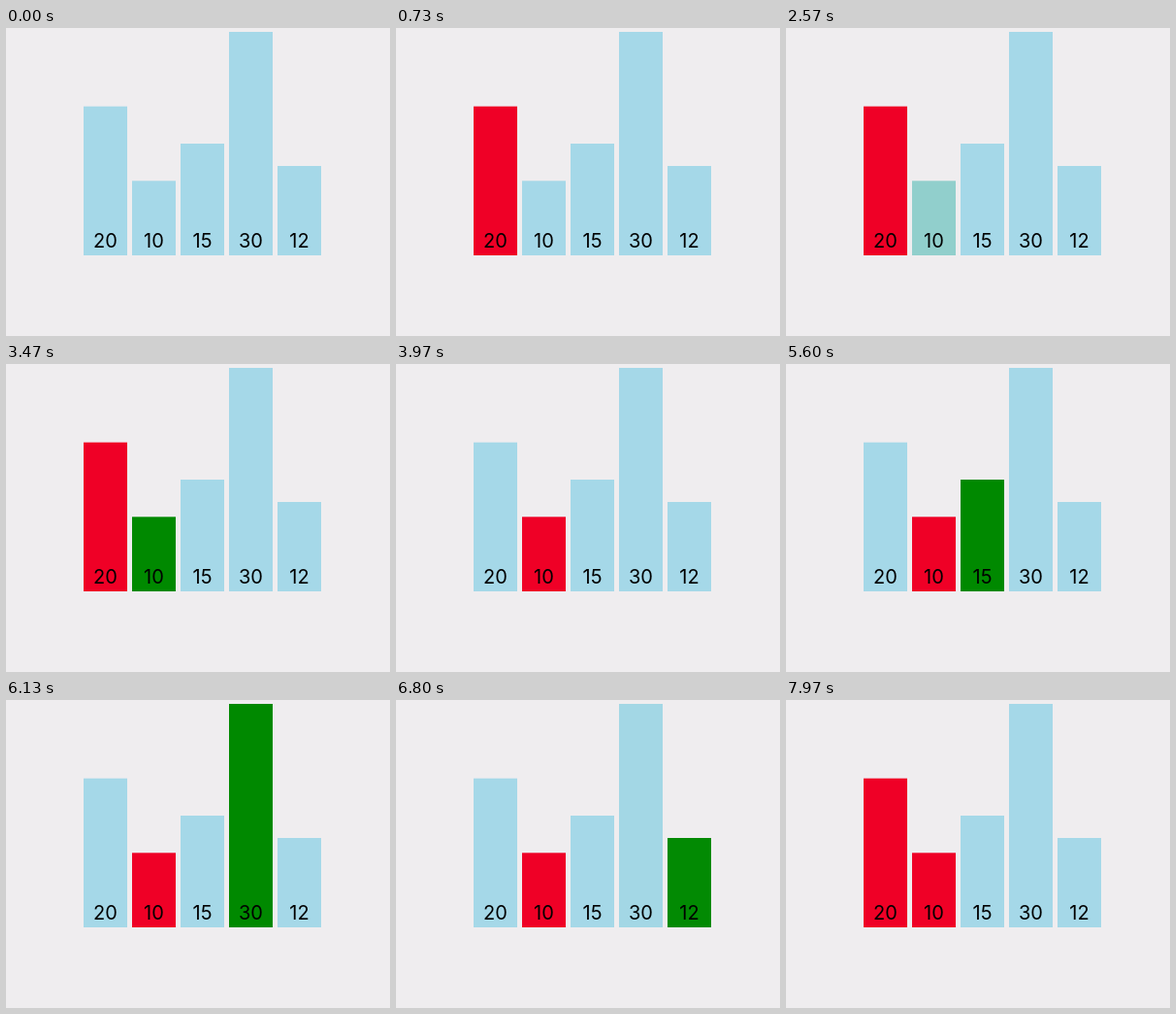
These frames come from a looping animation (396 by 317 pixels, 8 s). An HTML page:

```html
<!DOCTYPE html>
<html lang="en">
<head>
<meta charset="utf-8">
<title>Selection sort</title>
<style>
  :root {
    --idle: #a5d8e8;
    --min: #ef0026;
    --scan: #008900;
  }
  html, body {
    margin: 0;
    width: 100%;
    height: 100%;
    overflow: hidden;
    background: #efedef;
  }
  svg { display: block; width: 100vw; height: 100vh; }
  text {
    font: 400 20px Inter, "Liberation Sans", sans-serif;
    text-anchor: middle;
    fill: #000;
  }
  rect {
    fill: var(--idle);
    animation: 8s ease infinite;
  }
  #a { animation-name: a; }
  #b { animation-name: b; }
  #c { animation-name: c; }
  #d { animation-name: d; }
  #e { animation-name: e; }

  /* Each colour change eases over 200 ms (2.5% of the loop). */
  @keyframes a {
    0%, 3.94% { fill: var(--idle); }
    6.44%, 44.61% { fill: var(--min); }
    47.11%, 95.69% { fill: var(--idle); }
    98.19%, 100% { fill: var(--min); }
  }
  @keyframes b {
    0%, 31.85% { fill: var(--idle); }
    34.35%, 44.61% { fill: var(--scan); }
    47.11%, 100% { fill: var(--min); }
  }
  @keyframes c {
    0%, 57.39% { fill: var(--idle); }
    59.89%, 70.15% { fill: var(--scan); }
    72.65%, 100% { fill: var(--idle); }
  }
  @keyframes d {
    0%, 70.15% { fill: var(--idle); }
    72.65%, 82.91% { fill: var(--scan); }
    85.41%, 100% { fill: var(--idle); }
  }
  @keyframes e {
    0%, 82.91% { fill: var(--idle); }
    85.41%, 95.69% { fill: var(--scan); }
    98.19%, 100% { fill: var(--idle); }
  }
</style>
</head>
<body>
<svg viewBox="0 0 396 317">
  <rect id="a" x="80" y="80.67" width="45" height="153.33"/>
  <rect id="b" x="130" y="157.33" width="45" height="76.67"/>
  <rect id="c" x="180" y="119" width="45" height="115"/>
  <rect id="d" x="230" y="4" width="45" height="230"/>
  <rect id="e" x="280" y="142" width="45" height="92"/>
  <text x="102.5" y="226">20</text>
  <text x="152.5" y="226">10</text>
  <text x="202.5" y="226">15</text>
  <text x="252.5" y="226">30</text>
  <text x="302.5" y="226">12</text>
</svg>
</body>
</html>
```
